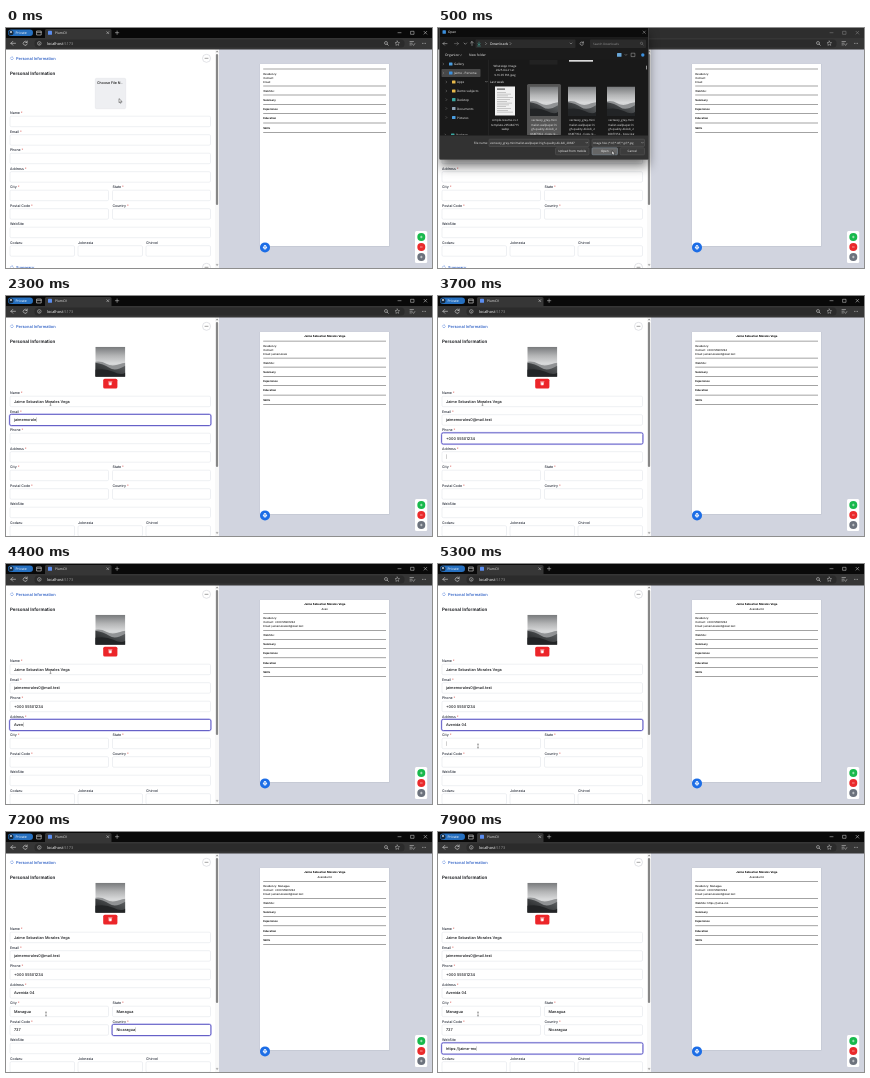
Write an HTML page that moves like this. It is 426 px wide and 240 px high and loops after 8 s.

```html
<!DOCTYPE html>
<html lang="en">
<head>
<meta charset="utf-8">
<title>CV form</title>
<style>
  html, body { margin: 0; width: 100%; height: 100%; overflow: hidden; background: #fff; }
  svg { display: block; width: 100%; height: 100%; }
  text { font-family: Inter, "Open Sans", sans-serif; text-rendering: geometricPrecision; white-space: pre; }
  .sys { font-family: "Open Sans", "Noto Sans", sans-serif; }
</style>
</head>
<body>
<svg id="stage" viewBox="0 0 426 240">
  <defs>
    <linearGradient id="sky" x1="0" y1="0" x2="0" y2="1">
      <stop offset="0" stop-color="#77797b"/>
      <stop offset=".3" stop-color="#b4b5b6"/>
      <stop offset=".55" stop-color="#d9dadb"/>
      <stop offset="1" stop-color="#a0a2a4"/>
    </linearGradient>
    <linearGradient id="hill" x1="0" y1="1" x2="1" y2="0">
      <stop offset="0" stop-color="#17191b"/>
      <stop offset="1" stop-color="#66696b"/>
    </linearGradient>
    <filter id="blur" x="-20%" y="-30%" width="140%" height="160%">
      <feGaussianBlur stdDeviation="6"/>
    </filter>
    <clipPath id="listClip"><rect x="2" y="32" width="208" height="75"/></clipPath>
  </defs>
  <g id="scene"></g>
</svg>
<script>
const LOOP = 8000, STEP = 100;
const DIALOG_OPEN = 200, FILE_PICK = 400, DIALOG_CLOSE = 600;
const scene = document.getElementById('scene');

// key, label, row, x, width, focus time, typing start, typing end, value
const fields = [
  ['name', 'Name *', 0, 4, 200.5, 800, 800, 1700, 'Jaime Sebastian Morales Vega'],
  ['email', 'Email *', 1, 4, 200.5, 1800, 1900, 2700, 'jaimemorales0@mail.test'],
  ['phone', 'Phone *', 2, 4, 200.5, 2800, 2900, 3500, '+000 55501234'],
  ['address', 'Address *', 3, 4, 200.5, 3700, 4000, 5000, 'Avenida 04'],
  ['city', 'City *', 4, 4, 98.5, 5300, 5400, 5700, 'Managua'],
  ['state', 'State *', 4, 106.5, 98, 5800, 5800, 6200, 'Managua'],
  ['postal', 'Postal Code *', 5, 4, 98.5, 6300, 6400, 6700, '737'],
  ['country', 'Country *', 5, 106.5, 98, 6800, 6800, 7200, 'Nicaragua'],
  ['site', 'WebSite', 6, 4, 200.5, 7300, 7300, 7900, 'https://jaime-mo'],
  ['code', 'Codaru', 7, 4, 64.5],
  ['work', 'Jobnexia', 7, 72, 64.5],
  ['chat', 'Chirvel', 7, 140, 64.5]
].map(([key, label, row, x, w, focus = Infinity, from, to, value = '']) =>
  ({ key, label, row, x, w, focus, from, to, value }));

// time, x, y
const pointer = [
  [0, 113, 71], [200, 110, 74], [300, 105, 77], [400, 106, 78], [500, 174, 123],
  [600, 174, 123], [800, 44.5, 107.5], [4900, 44.5, 107.5], [5200, 40, 182], [LOOP, 40, 182]
];

const rect = (x, y, w, h, fill, r = 0, stroke = 'none', sw = .5) =>
  `<rect x="${x}" y="${y}" width="${w}" height="${h}" rx="${r}" fill="${fill}" stroke="${stroke}" stroke-width="${sw}"/>`;
const disc = (x, y, r, fill, stroke = 'none', sw = .5) =>
  `<circle cx="${x}" cy="${y}" r="${r}" fill="${fill}" stroke="${stroke}" stroke-width="${sw}"/>`;
const line = (d, stroke, sw = .6, fill = 'none') =>
  `<path d="${d}" fill="${fill}" stroke="${stroke}" stroke-width="${sw}" stroke-linecap="round" stroke-linejoin="round"/>`;
// y is the middle of the capitals
const text = (x, y, s, size, fill, extra = '') =>
  `<text x="${x}" y="${y + size * .36}" font-size="${size}" fill="${fill}" ${extra}>${s}</text>`;
const sys = (x, y, s, size = 3, fill = '#f0f0f0', extra = '') =>
  text(x, y, s, size, fill, `class="sys" ${extra}`);
const BOLD = 'font-weight="700"', MEDIUM = 'font-weight="500"', MID = 'text-anchor="middle"';

const typed = (f, t) => {
  if (!(t >= f.focus)) return '';
  const p = Math.max(0, Math.min(1, (t - f.from) / (f.to - f.from)));
  return f.value.slice(0, Math.floor(f.value.length * p + 1e-6));
};

function photo(x, y, w, h) {
  return `<svg x="${x}" y="${y}" width="${w}" height="${h}" viewBox="0 0 30 30" preserveAspectRatio="none">
    <rect width="30" height="30" fill="url(#sky)"/>
    <path d="M0 15Q6 14 11 17T22 18T30 16V30H0Z" fill="#909294"/>
    <path d="M0 16Q8 17 14 21T30 19V30H0Z" fill="url(#hill)"/>
    <path d="M0 23Q10 21 18 25T30 26V30H0Z" fill="#222426"/></svg>`;
}

function browser(inactive) {
  const ink = '#d8d8d8', control = inactive ? '#888' : ink;
  return rect(0, 0, 426, 11, inactive ? '#2e2e2e' : '#090909') + rect(0, 10, 426, 11.5, '#363636')
    + rect(2, 1.5, 25, 6.5, '#2670c0', 3.2) + disc(5, 4.7, 2.5, '#17293c') + disc(5, 4, 1, '#cbd5df')
    + sys(9.5, 4.7, 'Private', 3.5, '#fff')
    + line('M31 3h4.2v4H31ZM31 4.3h4.2', ink, .6)
    + rect(39, 1, 66.5, 11, '#363636', 1.5) + rect(42, 2.8, 4, 4, '#5b8def', .6)
    + sys(49, 4.8, 'PlumCV', 3.3, '#eee')
    + line('M100.8 3.7l2 2m0 -2l-2 2M109.4 4.7h3.4m-1.7 -1.7v3.4', ink, .5)
    + line('M392 4.7h3M405 3.3h3v3h-3ZM418 3.3l2.8 2.8m0 -2.8l-2.8 2.8', control, .5)
    + rect(28.5, 11.5, 370, 8, '#2b2b2b', 3.5)
    + line('M9.5 15.3h-4.6m1.9 -1.9l-1.9 1.9l1.9 1.9', ink)
    + line('M21 14.3a2 2 0 1 0 .2 1.7m0 -3v1.5h-1.5', ink)
    + disc(33.3, 15.4, 1.8, 'none', ink) + line('M33.3 15.2v1', ink, .5)
    + sys(41, 15.3, 'localhost<tspan fill="#999">:5173</tspan>', 3.9, '#fff')
    + disc(380, 15, 1.5, 'none', ink) + line('M381.1 16.1l1.2 1.2', ink)
    + line('M391.3 13l.7 1.5l1.6 .2l-1.2 1.1l.3 1.6l-1.4 -.8l-1.4 .8l.3 -1.6l-1.2 -1.1l1.6 -.2Z', ink, .4)
    + line('M404 13.5h3.5m-3.5 1.7h2.2m-2.2 1.7h1.4M406.7 16.6l.8 .8l1.3 -1.8', ink, .5)
    + [416.4, 418, 419.6].map(x => disc(x, 15.3, .45, ink)).join('');
}

function section(y, title) {
  return line(`M4.7 ${y - .5}l1.2 -1.2l1.2 1.2m0 1l-1.2 1.2l-1.2 -1.2`, '#3b6fd4', .5)
    + text(10, y, title, 4, '#1f55c0', MEDIUM)
    + disc(200.5, y, 4, '#fff', '#c4c7cf') + line(`M199 ${y}h3`, '#444', .5);
}

function form(t, loaded) {
  const shift = loaded ? 12 : 0;
  const last = at => fields.filter(f => f.focus <= at).pop();
  const active = last(t), ringed = last(t - STEP);
  let out = rect(0, 21, 209, 219, '#fff') + section(30.3, 'Personal Information')
    + text(4, 45, 'Personal Information', 4.5, '#0c0e12', 'font-weight="600"');
  if (loaded) {
    out += photo(89.3, 50.8, 30, 30) + rect(97.2, 82.7, 14.2, 9.8, '#ec2529', 1.6)
      + line('M103 86.4h2.6l-.3 2.7h-2ZM102.6 85.6h3.4', '#fff', .4, '#fff');
  } else {
    out += rect(89.3, 50.3, 30.4, 30.4, '#eeeff2', 1.2, '#e0e2e7')
      + text(91, 54.8, 'Choose File N..', 3.55, '#111', MEDIUM);
  }
  for (const f of fields) {
    const y = 88.2 + 18.5 * f.row + shift;
    const caret = f === active ? '<tspan fill="#222" font-weight="300">|</tspan>' : '';
    out += text(f.x, y - 3.1, f.label.replace('*', '<tspan fill="#d9534f">*</tspan>'), 3.5, '#262c38', MEDIUM)
      + (f === ringed
        ? rect(f.x - .9, y - .9, f.w + 1.8, 12.3, '#fff', 2, '#c9c6f5', .8)
          + rect(f.x - .35, y - .35, f.w + .7, 11.2, '#fff', 1.6, '#4f4abf', .9)
        : rect(f.x, y, f.w, 10.5, '#fff', 1.3, '#dde0e6'))
      + text(f.x + 4, y + 5.4, typed(f, t) + caret, 3.8, '#0d0f13', MEDIUM);
  }
  if (!loaded) out += section(239.3, 'Summary');
  return out + rect(209, 21, 4, 219, '#f8f8f8') + rect(209.9, 26, 2.2, loaded ? 145 : 151, '#878787', 1.1)
    + line('M210.2 24l.9 -1.2l.9 1.2Z', '#777', .2, '#777')
    + line('M210.2 236.5l.9 1.2l.9 -1.2Z', '#777', .2, '#777');
}

function preview(t) {
  const v = Object.fromEntries(fields.map(f => [f.key, typed(f, t)]));
  const off = v.address ? 8.3 : v.name ? 4.1 : 0;
  const ink = '#111', size = 2.65;
  const rule = y => rect(257.2, y + off - .3, 122.8, .6, '#666');
  const row = (y, s, extra = MEDIUM) => text(257.3, y + off, s, size, ink, extra);
  let out = rect(213, 21, 213, 219, '#d1d4df') + rect(253.6, 35.7, 130, 183, '#c3c7d2', .5)
    + rect(254, 36, 129, 182, '#fff')
    + text(318.7, 40.5, v.name, 2.75, '#000', `${BOLD} ${MID}`)
    + text(318.7, 44.6, v.address, size, ink, `${MEDIUM} ${MID}`)
    + [41, 58, 67, 76.3, 85.5, 95, 104.3].map(rule).join('')
    + row(45.6, `Residency: ${v.city}`) + row(49.7, `Contact: ${v.phone}`)
    + row(53.8, `Email: ${v.email}`) + row(62.6, `WebSite: ${v.site}`);
  ['Summary', 'Experience', 'Education', 'Skills'].forEach((s, i) => out += row(71.8 + i * 9.25, s, BOLD));
  out += disc(259, 219.4, 5, '#1c6de6')
    + rect(257.9, 217.2, 2.2, 1, '#fff') + rect(256.9, 218.6, 4.2, 2, '#fff', .5)
    + rect(257.9, 219.9, 2.2, 1.7, '#fff', 0, '#1c6de6', .4)
    + rect(409, 203, 12.2, 32, '#fff', 1.5);
  ['#18b94c', '#ea2a2c', '#6c727d'].forEach((c, i) => {
    const y = 209 + i * 10;
    out += disc(415.3, y, 4, c) + line(i === 1 ? `M414.4 ${y}h1.8` : `M414.4 ${y}h1.8m-.9 -.9v1.8`, '#fff', .5);
  });
  return out;
}

function dialog(t) {
  const picked = t >= FILE_PICK, gray = '#cfcfcf';
  const name = 'vecteezy_gray-minimalist-wallpaper-high-quality-4k-bdi_20687';
  const caption = (x, lines) => lines.map((s, i) => sys(x, 92 + i * 4.5, s, 2.9, '#f0f0f0', MID)).join('');
  const button = (x, w, s, fill = '#3c3c3c', edge = '#5a5a5a') =>
    rect(x, 119.8, w, 7, fill, 1, edge) + sys(x + w / 2, 123.3, s, 3, '#fff', MID);
  const tree = [
    [36, 0, 'Gallery', '#4a9de0'], [45, 0, 'Jaime - Persona', '#3b8fdd'], [54, 3, 'Apps', '#e8b94a'],
    [63, 3, 'Demo subjects', '#e8b94a'], [71.7, 3, 'Desktop', '#3aa6a0'],
    [80.5, 3, 'Documents', '#8fa3b5'], [89.5, 3, 'Pictures', '#4a9de0'], [107, 2, 'Desktop', '#3aa6a0']
  ];
  let out = `<g filter="url(#blur)" opacity=".55">${rect(2, 6, 208, 132, '#000')}</g>`
    + rect(1.5, 0, 209, 131.5, '#323232', 1, '#4a4a4a') + rect(2, 0, 208, 9.5, '#0c0c0c')
    + rect(4.5, 2.3, 3.4, 3.4, '#3b8fdd', .5) + sys(10, 4.2, 'Open', 3.2, '#fff')
    + line('M205 3l2.4 2.4m0 -2.4l-2.4 2.4', gray, .4)
    + rect(2, 9.5, 208, 22.5, '#1b1b1b') + rect(37.5, 11.5, 100, 8.5, '#2b2b2b', 1) + rect(152, 11.5, 56, 8.5, '#2b2b2b', 1)
    + line('M9 15.6h-4m1.5 -1.5l-1.5 1.5l1.5 1.5', gray, .5) + line('M16.5 15.6h4m-1.5 -1.5l1.5 1.5l-1.5 1.5', '#888', .5)
    + line('M26 15l1.3 1.3l1.3 -1.3M34 17.5v-4m-1.5 1.5l1.5 -1.5l1.5 1.5', gray, .5)
    + line('M41 14v3m-1.2 -1.3l1.2 1.3l1.2 -1.3M39.6 18h2.8', '#46b0a0', .5)
    + line('M47.5 14.5l1.1 1.1l-1.1 1.1M72 14.5l1.1 1.1l-1.1 1.1M132 15l1 1l1 -1', gray, .4)
    + sys(52, 15.6, 'Downloads', 3.5, '#fff')
    + line('M145.2 14.7a1.7 1.7 0 1 0 .2 1.4m0 -2.4v1.3h-1.3', gray, .5) + sys(155, 15.6, 'Search Downloads', 3, '#999')
    + disc(203.5, 15.3, 1.1, 'none', '#999', .4) + line('M204.4 16.2l.8 .8', '#999', .4)
    + sys(7, 27, 'Organize', 3.3) + line('M21.8 26.7l.9 .9l.9 -.9', gray, .4) + sys(31, 27, 'New folder', 3.3)
    + rect(179, 25, 4.5, 3.8, '#69a7d9', .5) + line('M187 26.5l.9 .9l.9 -.9M193.5 25.2h3.4v3.4h-3.4Z', gray, .4)
    + disc(204.8, 27, 1.7, '#3b8fdd') + rect(2, 31.7, 208, 75.8, '#191919') + rect(50, 31.7, .4, 75.8, '#333');
  let list = rect(3.5, 41, 39, 8, '#484848', .8);
  for (const [y, pad, s, color] of tree)
    list += line(`M${5 + pad} ${y - .9}l.9 .9l-.9 .9`, '#999', .4)
      + rect(11 + pad, y - 1.6, 3.5, 3.2, color, .5) + sys(16 + pad, y, s, 3.1);
  list += ['WhatsApp Image', '2025-04-21 at', '9.16.05 PM.jpeg'].map((s, i) =>
      sys(67, 37.5 + i * 4.5, s, 2.9, '#f0f0f0', MID)).join('')
    + rect(91.5, 31.7, 28, 5, '#222') + rect(131, 31.7, 24, 2, '#dadada')
    + sys(52, 53.7, 'Last week', 3.1) + line('M47.5 53.3l.9 .9l.9 -.9', gray, .4)
    + (picked ? rect(89.5, 56.5, 33, 51, '#555', .8, '#707070') : '')
    + rect(57, 58.5, 20, 29, '#f1f1f1') + rect(59, 60.5, 8, 1.2, '#555');
  for (let i = 0; i < 12; i++)
    list += rect(59, 64 + i * 1.8, 9 + (i * 5) % 8, .6, '#aaa');
  list += caption(67, ['simple-resume-cv-t', 'template-295484715', '.webp']);
  for (const x of [106, 144, 183])
    list += photo(x - 14, 58.5, 28, 29.5)
      + caption(x, ['vecteezy_gray-mini', 'malist-wallpaper-hi', 'gh-quality-4k-bdi_2',
        x > 150 ? '068f7354 - Copy.jpg' : '068f7354 - Copy (2...']);
  out += `<g clip-path="url(#listClip)">${list}</g>`
    + rect(208, 37.5, 1, 4, '#999', .5)
    + sys(50, 114.8, 'File name:', 3, '#f0f0f0', 'text-anchor="end"')
    + rect(51, 111.2, 100, 7.2, '#3c3c3c', .6, '#5a5a5a') + sys(52, 114.8, picked ? name : '', 2.95)
    + rect(154, 111.2, 52.5, 7.2, '#3c3c3c', .6, '#5a5a5a') + sys(155.3, 114.8, 'Image files (*.tif;*.tiff;*.gif;*.jpg', 2.8)
    + line('M148 114.4l.8 .8l.8 -.8M203.6 114.4l.8 .8l.8 -.8', gray, .4)
    + button(117.5, 33.5, 'Upload from mobile') + button(154, 25.5, 'Open', '#666', '#8a9aa8') + button(182, 24.5, 'Cancel');
  return out;
}

function cursor(t) {
  const i = pointer.findIndex(p => p[0] > t);
  const [t0, x0, y0] = pointer[i - 1], [t1, x1, y1] = pointer[i];
  const p = (t - t0) / (t1 - t0), k = p * p * (3 - 2 * p);
  const x = x0 + (x1 - x0) * k, y = y0 + (y1 - y0) * k;
  return t >= 800
    ? line(`M${x - .6} ${y - 1.8}h1.2m-.6 0v3.6m-.6 0h1.2`, '#444', .4)
    : line(`M${x} ${y}v3.7l.9 -.8l.6 1.4l.7 -.3l-.6 -1.3h1.2Z`, '#111', .4, '#fff');
}

function draw(t) {
  const open = t >= DIALOG_OPEN && t < DIALOG_CLOSE;
  return form(t, t >= DIALOG_CLOSE) + preview(t) + browser(open) + (open ? dialog(t) : '') + cursor(t);
}

let shown = -1;
function tick() {
  const t = Math.floor(performance.now() % LOOP / STEP) * STEP;
  if (t !== shown) scene.innerHTML = draw(shown = t);
  requestAnimationFrame(tick);
}
tick();
</script>
</body>
</html>
```
